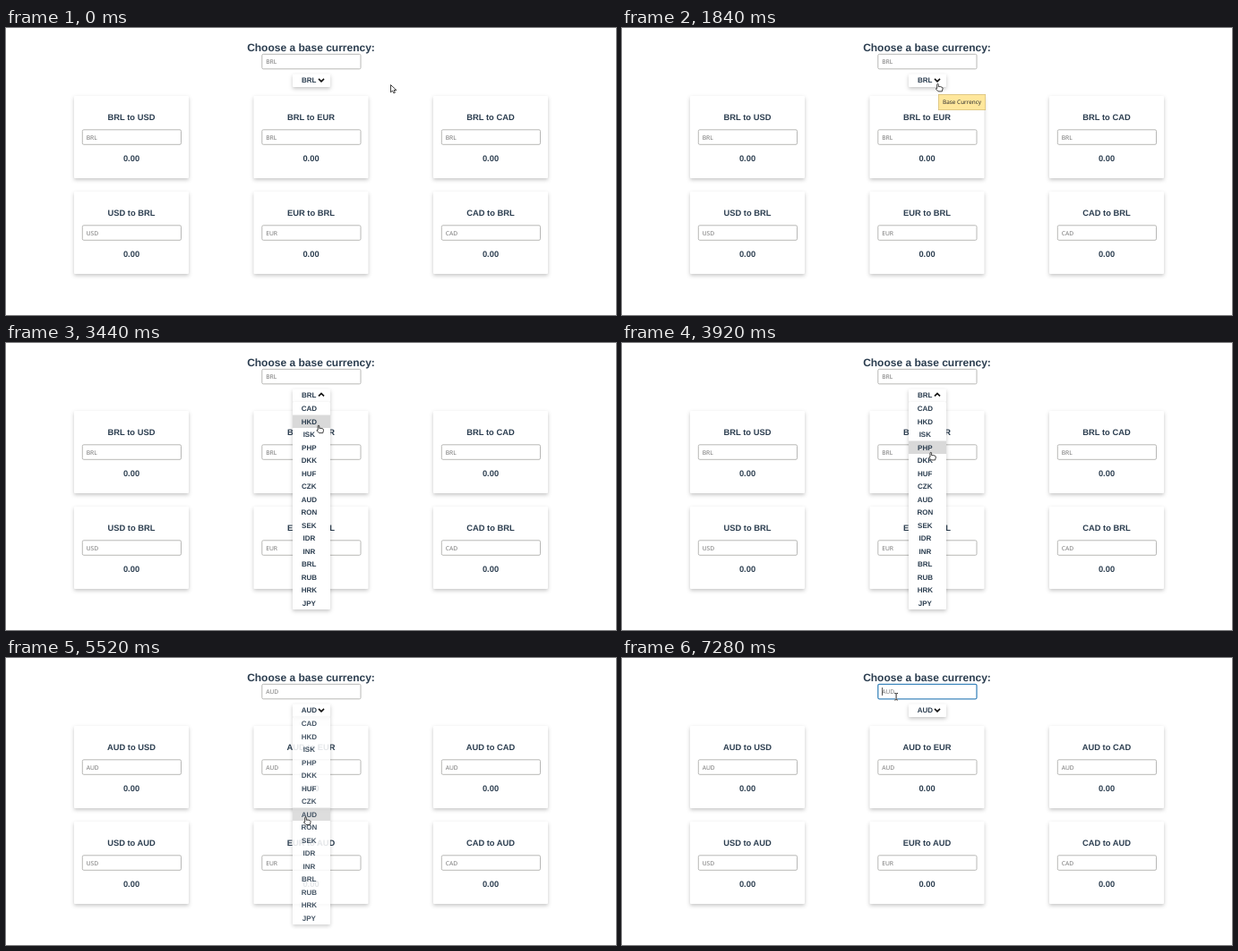
An HTML page for the animation above (8 s loop, 681x321 px).

```html
<!DOCTYPE html>
<html lang="en">
<head>
<meta charset="utf-8">
<title>Currency converter</title>
<style>
  html, body { margin: 0; width: 100%; height: 100%; overflow: hidden; background: #fff; }
  svg { display: block; width: 681px; height: 321px; text-rendering: geometricPrecision; }
  text { font-family: "Liberation Sans", Arial, sans-serif; font-weight: 700; fill: #2c3e50; text-anchor: middle; }
  .h2 { font-size: 12px; }
  .h3 { font-size: 9.36px; }
  .opt { font-size: 8px; }
  .hint { font: 400 6.67px "Noto Sans", "Open Sans", sans-serif; fill: #757575; text-anchor: start; }
  .tip { font: 400 6.4px "Noto Sans", "Open Sans", sans-serif; fill: #2b2b2b; }
  .shadow { filter: blur(2px); fill: rgba(0, 0, 0, .22); }
  .box { fill: #fff; }
  .input { fill: #fff; stroke: #b0b0ae; stroke-width: .9; }
  .input.focus { stroke: #3f87bd; stroke-width: 1.3; }
  .chev { fill: none; stroke: #111; stroke-width: 1.6; }
  .pointer { fill: #fff; stroke: #111; stroke-width: .8; stroke-linejoin: round; }
</style>
</head>
<body>
<svg id="stage" viewBox="0 0 681 321"></svg>
<script>
const LOOP = 8000, TICK = 40;
const ROW = 14.5, LIST_TOP = 66;
const CODES = 'CAD HKD ISK PHP DKK HUF CZK AUD RON SEK IDR INR BRL RUB HRK JPY'.split(' ');
const stage = document.getElementById('stage');

function add(parent, tag, attrs, content) {
  const el = document.createElementNS('http://www.w3.org/2000/svg', tag);
  for (const key in attrs) el.setAttribute(key, attrs[key]);
  if (content) el.textContent = content;
  parent.appendChild(el);
  return el;
}
const group = parent => add(parent, 'g', {});
const rect = (parent, cls, x, y, width, height, extra) =>
  add(parent, 'rect', { class: cls, x, y, width, height, ...extra });
const text = (parent, cls, x, y, content) => add(parent, 'text', { class: cls, x, y }, content);

function panel(parent, x, y, w, h) {
  rect(parent, 'shadow', x, y + 2, w, h);
  rect(parent, 'box', x, y, w, h, { rx: 1 });
}
const input = (x, y) => rect(stage, 'input', x, y, 110.2, 16.5, { rx: 1.5 });

// Labels that follow the chosen base currency
const labels = [];
const bind = (el, format) => labels.push([el, format]);

text(stage, 'h2', 340.5, 25.9, 'Choose a base currency:');
const baseInput = input(285.8, 29.3);
bind(text(stage, 'hint', 290.2, 40), base => base);

['USD', 'EUR', 'CAD'].forEach((code, col) => {
  for (let row = 0; row < 2; row++) {
    const x = 76 + col * 200.5, y = 76 + row * 107;
    panel(stage, x, y, 128, 92);
    bind(text(stage, 'h3', x + 64, y + 26.6), base => row ? `${code} to ${base}` : `${base} to ${code}`);
    input(x + 9.3, y + 37.8);
    bind(text(stage, 'hint', x + 13.7, y + 48.5), base => row ? code : base);
    text(stage, 'h3', x + 64, y + 72.6, '0.00');
  }
});

panel(stage, 320, 51.5, 42, 14.5);
const list = group(stage);
panel(list, 320, LIST_TOP, 42, ROW * CODES.length);
const hover = rect(list, '', 320, 0, 42, ROW, { fill: '#d9d9d9' });
CODES.forEach((code, i) => text(list, 'opt', 338.3, LIST_TOP + ROW * i + 10, code));
bind(text(stage, 'opt', 338.3, 61.4), base => base);
const chevron = add(stage, 'path', { class: 'chev' });

const tooltip = group(stage);
rect(tooltip, '', 353.4, 74.4, 52.3, 17.2, { fill: '#ffe79c', stroke: '#d9c077', 'stroke-width': .8 });
text(tooltip, 'tip', 379.6, 85.4, 'Base Currency');

const caret = rect(stage, '', 290.3, 33, .8, 9, { fill: '#222' });

const pointers = { arrow: group(stage), hand: group(stage), beam: group(stage) };
add(pointers.arrow, 'path', { class: 'pointer',
  d: 'M.5 .6V8.9L2.5 7.1L3.9 9.9L5.4 9.2L4.1 6.5H6.9Z' });
add(pointers.hand, 'path', { class: 'pointer',
  d: 'M-.9 5.3V.8Q-.9 0 -.1 0T.7 .8V3.2Q3 2.8 5 4Q5.7 4.4 5.4 5.6L4.7 8.5H.5L-2 6Q-2.3 4.7 -.9 5.3Z' });
for (const [stroke, width] of [['#fff', 2], ['#111', .9]])
  add(pointers.beam, 'path', { fill: 'none', stroke, 'stroke-width': width,
    d: 'M-1.9 -3.8Q0 -3.8 0 -3V3Q0 3.8 -1.9 3.8M1.9 -3.8Q0 -3.8 0 -3M0 3Q0 3.8 1.9 3.8' });

// time, x, y of the pointer's hot spot
const PATH = [
  [0, 429, 63], [640, 429, 63], [1000, 380, 57], [1160, 380, 57], [1360, 352.6, 62.4],
  [2960, 352.6, 62.4], [3800, 346.4, 114.5], [3920, 344.9, 122.4], [4640, 335.2, 167.6],
  [4880, 334.6, 178], [6080, 334.6, 178], [6320, 316.5, 147.5], [6600, 309.5, 100],
  [6920, 306.1, 45], [6960, 306.1, 43.2], [LOOP, 306.1, 43.2]
];
const clamp = v => Math.max(0, Math.min(1, v));
const smooth = p => p * p * (3 - 2 * p);

function pointerAt(t) {
  const i = PATH.findIndex(p => p[0] > t);
  const [t0, x0, y0] = PATH[i - 1], [t1, x1, y1] = PATH[i];
  let p = (t - t0) / (t1 - t0);
  if (t < 1400) p = (p + smooth(p)) / 2;
  return [x0 + (x1 - x0) * p, y0 + (y1 - y0) * p];
}

function pointerKind(x, y, shown) {
  const inside = (l, top, r, b) => x >= l && x <= r && y >= top && y <= b;
  if (inside(320, 51, 362, 66) || (shown && inside(320, 66, 362, 298))) return 'hand';
  if (inside(285, 29, 396, 46) || inside(285, 113.5, 396, 130.5)) return 'beam';
  return 'arrow';
}

const show = (el, on) => el.setAttribute('visibility', on ? 'visible' : 'hidden');

function render(time) {
  const t = Math.floor(time / TICK) * TICK;
  const opened = t >= 2520 && t < 5480;
  const fade = smooth(clamp((t - 2480) / 360)) * (1 - smooth(clamp((t - 5440) / 360)));
  const [x, y] = pointerAt(t);
  const kind = pointerKind(x, y, fade > 0);
  const row = Math.floor((y - LIST_TOP) / ROW);

  const base = t < 5480 ? 'BRL' : 'AUD';
  for (const [el, format] of labels) el.textContent = format(base);
  chevron.setAttribute('d', opened ? 'M349 59.4L352 56.4L355 59.4' : 'M349 56.9L352 59.9L355 56.9');
  list.setAttribute('opacity', fade);
  hover.setAttribute('y', LIST_TOP + row * ROW);
  hover.setAttribute('opacity', row >= 0 && kind === 'hand' ? 1 : 0);
  show(tooltip, t >= 1840 && t < 2360);
  baseInput.classList.toggle('focus', t >= 7160);
  show(caret, t >= 7280);
  for (const name in pointers) show(pointers[name], name === kind);
  pointers[kind].setAttribute('transform', `translate(${x} ${y})`);
}

const start = performance.now();
function loop() {
  render((performance.now() - start) % LOOP);
  requestAnimationFrame(loop);
}
loop();
</script>
</body>
</html>
```
